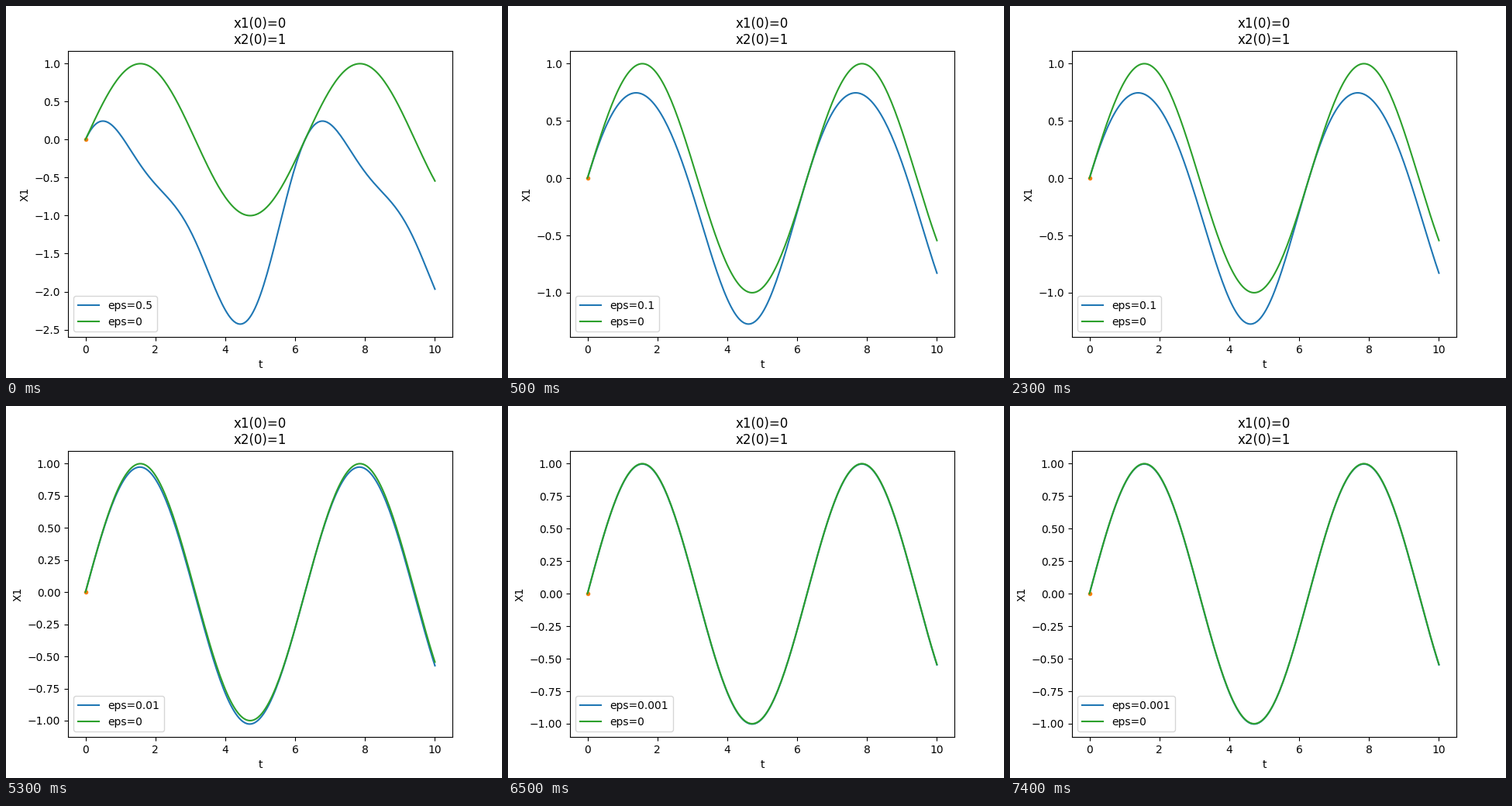
Recreate the animation shown at these times as a matplotlib script. Size 640 by 480 pixels, loop 8000 ms.

```python
import numpy as np
import matplotlib.pyplot as plt
from matplotlib.animation import FuncAnimation

STEP = 500  # ms per frame
FRAMES = 16
SCENES = [(0, 0.5), (500, 0.1), (3500, 0.01), (6500, 0.001)]  # start ms, eps

t = np.linspace(0, 10, 201)
fig, ax = plt.subplots(figsize=(6.4, 4.8), dpi=100)


def solution(eps):
    """Solve x'' + x = -4 eps cos(t)^2 with x(0) = 0, x'(0) = 1."""
    return np.sin(t) + eps * (4 * np.cos(t) + 2 * np.cos(2 * t) - 6) / 3


def draw(i):
    eps = [e for start, e in SCENES if start <= i * STEP][-1]
    ax.clear()
    ax.plot(t, solution(eps), color="C0", label=f"eps={eps}")
    ax.plot(0, 0, ".", color="C1")
    ax.plot(t, solution(0), color="C2", label="eps=0")
    ax.set_title("x1(0)=0\nx2(0)=1")
    ax.set_xlabel("t")
    ax.set_ylabel("X1")
    ax.legend(loc="lower left")
    return ax.lines


anim = FuncAnimation(fig, draw, frames=FRAMES, interval=STEP,
                     repeat=True, repeat_delay=0)
plt.show()
```
